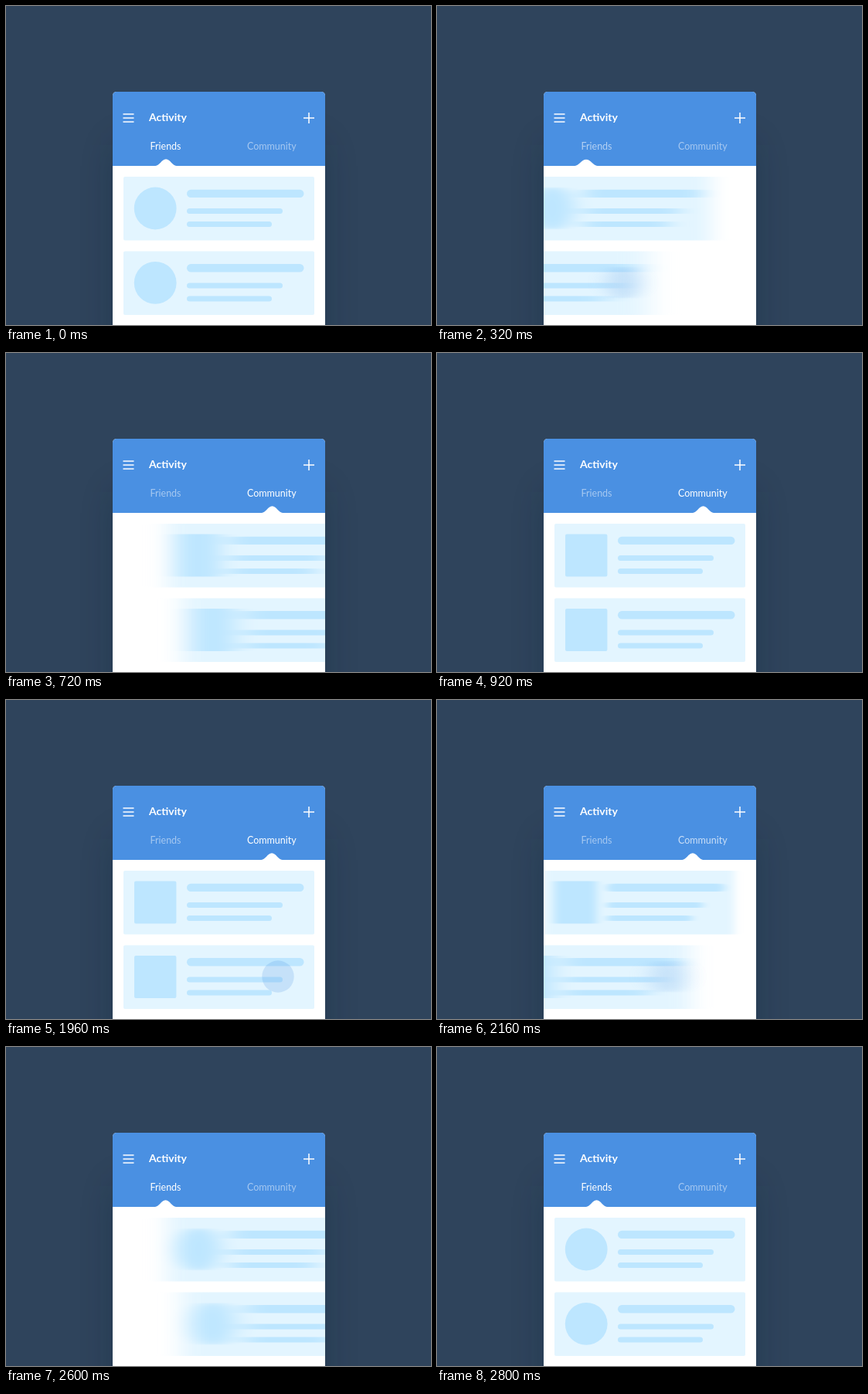
Recreate the animation shown at these times as an HTML page. Size 550x413 px, loop 3.8 s.

```html
<!DOCTYPE html>
<html lang="en">
<head>
<meta charset="utf-8">
<title>Activity tabs</title>
<style>
  html, body { margin: 0; width: 100%; height: 100%; overflow: hidden; background: #2f445c; }
  svg { position: absolute; left: 0; top: 0; width: 100%; height: 100%; }
  text { font-family: Lato, sans-serif; font-size: 12.5px; fill: #fff; }
  .title { font-size: 14px; font-weight: 700; }
  .icon { stroke: #fff; stroke-width: 1.5; }
  .card { fill: #e3f5ff; }
  .item { fill: #bde6ff; }
</style>
</head>
<body>
<svg viewBox="0 0 550 413">
  <defs>
    <clipPath id="panel"><rect x="138" y="111" width="275" height="320" rx="5"/></clipPath>
    <filter id="soft" filterUnits="userSpaceOnUse" x="0" y="0" width="550" height="600">
      <feGaussianBlur stdDeviation="24"/>
    </filter>
    <g id="card">
      <rect class="card" x="152" y="221" width="247" height="82.5" rx="2"/>
      <g class="item">
        <rect x="234" y="237.7" width="151.5" height="10.4" rx="5.2"/>
        <rect x="234" y="262" width="124" height="7" rx="3.5"/>
        <rect x="234" y="279" width="110" height="7" rx="3.5"/>
      </g>
    </g>
  </defs>

  <rect x="144" y="180" width="263" height="320" fill="#0c1a30" opacity=".32" filter="url(#soft)"/>
  <g clip-path="url(#panel)">
    <rect x="138" y="111" width="275" height="320" fill="#fff"/>
    <g id="rows"></g>
    <circle id="touch" cy="358" r="20.7" fill="#4a90e2"/>
    <rect x="138" y="111" width="275" height="96" fill="#4a90e2"/>
    <g fill="#fff">
      <path class="bump" d="M-15 .2C-7.5 0-6-8.8 0-8.8S7.5 0 15 .2Z"/>
      <path class="bump" d="M-15 .2C-7.5 0-6-8.8 0-8.8S7.5 0 15 .2Z"/>
    </g>
    <path class="icon" d="M151.5 140h14M151.5 145h14M151.5 150h14M385 145h14M392 138v14"/>
    <text class="title" x="185" y="149">Activity</text>
    <g text-anchor="middle">
      <text class="tab" x="206.5" y="186">Friends</text>
      <text class="tab" x="343.8" y="186">Community</text>
    </g>
  </g>
</svg>
<script>
const LOOP = 3800, STEP = 40, SWIPES = [80, 1960];
const WIDTH = 275, TAB_X = [207, 344], HALF = WIDTH / 2;
const SVG = 'http://www.w3.org/2000/svg';

const progress = (t, start, length) => Math.min(1, Math.max(0, (t - start) / length));
const cubicInOut = u => u < .5 ? 4 * u ** 3 : 1 - 4 * (1 - u) ** 3;
const $ = selector => document.querySelector(selector);
const $$ = selector => [...document.querySelectorAll(selector)];

function add(parent, name, attributes = {}) {
  const node = document.createElementNS(SVG, name);
  for (const key in attributes) node.setAttribute(key, attributes[key]);
  return parent.appendChild(node);
}

// Horizontal motion blur, matched to the distance covered in one step.
function makeBlur(node, id) {
  const filter = add($('defs'), 'filter', {
    id, filterUnits: 'userSpaceOnUse', x: -200, y: 100, width: 950, height: 320,
    'color-interpolation-filters': 'sRGB'
  });
  const blur = add(filter, 'feGaussianBlur');
  return distance => {
    const deviation = Math.abs(distance) / Math.sqrt(12);
    blur.setAttribute('stdDeviation', deviation + ' 0');
    if (deviation > .3) node.setAttribute('filter', `url(#${id})`);
    else node.removeAttribute('filter');
  };
}

const rows = [
  { y: 0, exit: { power: 4, length: 253 }, enter: { power: 4, length: 290 } },
  { y: 96.4, exit: { power: 2, length: 237 }, enter: { power: 3, length: 270 } }
].map((row, i) => {
  const node = add($('#rows'), 'g');
  add(node, 'use', { href: '#card', y: row.y });
  const circle = add(node, 'circle', { class: 'item', cx: 193.2, cy: 262 + row.y, r: 27.4 });
  const square = add(node, 'rect', {
    class: 'item', x: 166, y: 234.5 + row.y, width: 54.4, height: 55, rx: 2
  });
  return { ...row, node, avatars: [circle, square], blur: makeBlur(node, 'blur' + i) };
});

const touch = $('#touch'), bumps = $$('.bump'), tabs = $$('.tab');
const blurTouch = makeBlur(touch, 'blurTouch');
const touchX = t => 352 - 152 * cubicInOut(progress(t, 80, 270));

function rowOffset(row, t, entering) {
  return entering
    ? WIDTH * (1 - progress(t, 545, row.enter.length)) ** row.enter.power
    : -WIDTH * progress(t, 80, row.exit.length) ** row.exit.power;
}

const travel = (position, t) => position(t + STEP / 2) - position(t - STEP / 2);

function draw(time) {
  time = Math.floor(time % LOOP / STEP) * STEP;
  const from = time < SWIPES[1] ? 0 : 1, to = 1 - from;
  const t = time - SWIPES[from];
  const entering = t > 440;

  for (const row of rows) {
    const offset = when => rowOffset(row, when, entering);
    row.node.setAttribute('transform', `translate(${offset(t)})`);
    row.blur(travel(offset, t));
    row.avatars.forEach((avatar, i) =>
      avatar.setAttribute('visibility', i === (entering ? to : from) ? 'inherit' : 'hidden'));
  }

  touch.setAttribute('cx', touchX(t));
  touch.setAttribute('opacity', t < 0 ? 0 : .2 * (1 - progress(t, 260, 130)));
  blurTouch(travel(touchX, t));

  // The bump is pulled by the finger, then released; it wraps round the panel edge.
  const shift = 14 * cubicInOut(progress(t, 80, 160)) + (HALF - 14) * cubicInOut(progress(t, 246, 367));
  const squash = Math.sin(Math.PI * progress(t, 220, 280));
  bumps.forEach((bump, i) => bump.setAttribute('transform',
    `translate(${TAB_X[from] - shift + i * WIDTH} 207) scale(${1 + .35 * squash} ${1 - .34 * squash})`));

  tabs[from].setAttribute('opacity', 1 - .5 * progress(t, 100, 170));
  tabs[to].setAttribute('opacity', .5 + .5 * progress(t, 380, 160));
}

const start = performance.now();
function tick() {
  draw(performance.now() - start);
  requestAnimationFrame(tick);
}
tick();
</script>
</body>
</html>
```
